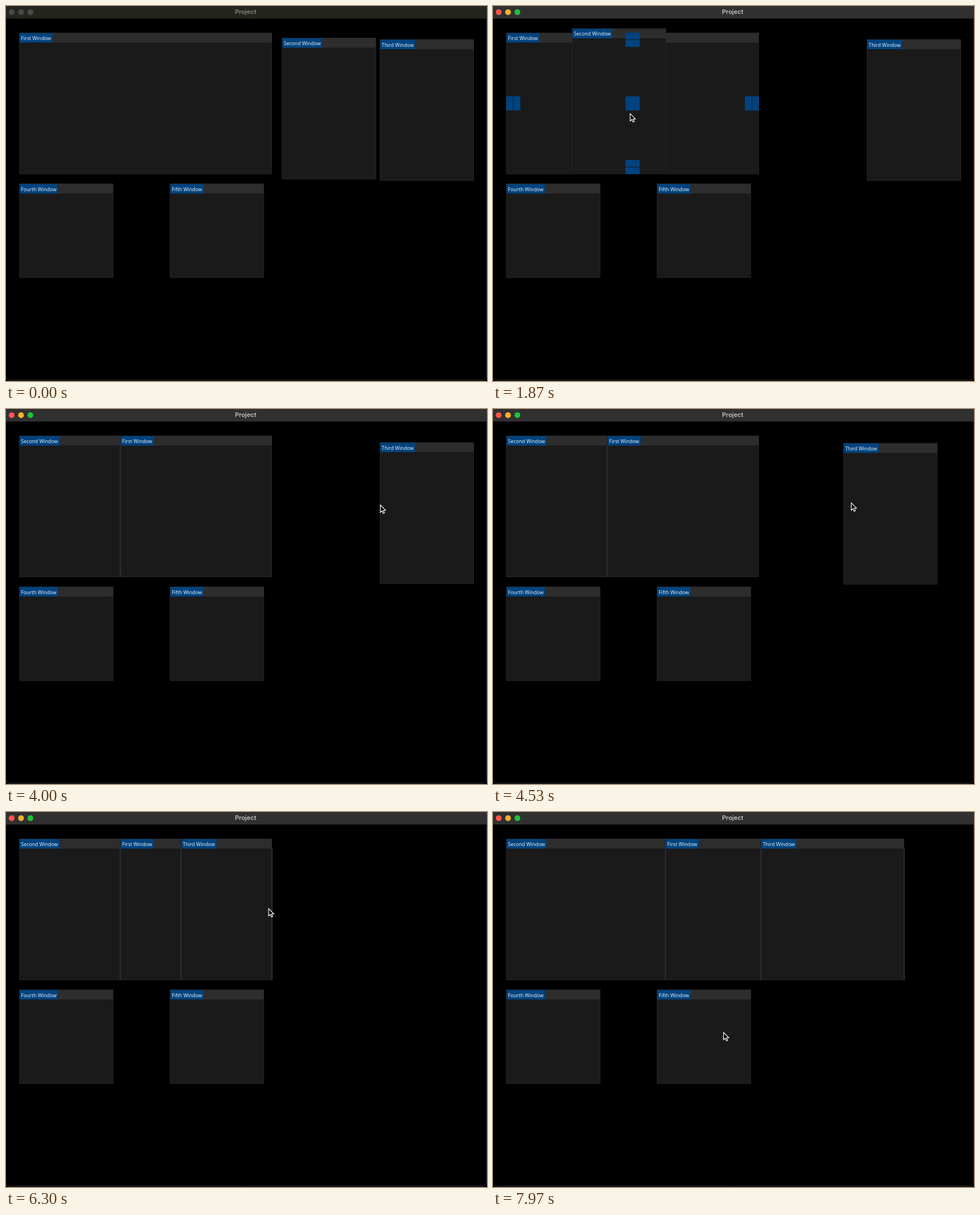
Write an HTML page with a canvas that moves like this. It is 848 by 660 pixels and loops after 8000 ms.

```html
<!DOCTYPE html>
<html lang="en">
<head>
<meta charset="utf-8">
<title>Project</title>
<style>
  html, body { margin: 0; width: 100%; height: 100%; overflow: hidden; background: #000; }
  canvas { display: block; }
</style>
</head>
<body>
<canvas id="stage" width="848" height="660"></canvas>
<script>
const ctx = document.getElementById('stage').getContext('2d');
const LOOP = 8000, ACTIVATE = 1000, RESIZE = 7000;
const LAG = 90; // the app reacts this long after the pointer
const UNIT = 0.83; // one app pixel on the stage
const BLUE = '#00437f', HOT = '#0063a9', BODY = '#1a1a1a', BAR = '#2d2d2d', BORDER = '#2b2b31';
const TITLE = 21 * UNIT, PANEL = 200 * UNIT;
const dock = { x: 28 * UNIT, y: 46.9, w: 537 * UNIT, h: 300 * UNIT };
const dragSecond = { from: 1500, drop: 2850 };
const dragThird = { from: 4450, drop: 5700 };

// Each move eases the pointer to a new resting place
const moves = [
  { from: 100, to: 800, x: 589, y: 206 },
  { from: dragSecond.from, to: 2430, x: 45.5, y: 180 },
  { from: 3100, to: 3930, x: 660, y: 169 },
  { from: 4150, to: 4300, x: 673, y: 164 },
  { from: dragThird.from, to: 5230, x: 463, y: 170 },
  { from: 6300, to: 6750, x: 470, y: 175 },
  { from: RESIZE, to: 7631, x: 726, y: 175 },
  { from: 7830, to: 7970, x: 406.5, y: 388 }
];

const clamp = k => Math.min(1, Math.max(0, k));
const easeOut = k => 1 - (1 - k) ** 2;

function pointer(t) {
  return moves.reduce((p, m) => {
    const k = easeOut(clamp((t - m.from) / (m.to - m.from)));
    return { x: p.x + (m.x - p.x) * k, y: p.y + (m.y - p.y) * k };
  }, { x: 612, y: 640 });
}

function offset(t, start) {
  const now = pointer(t), grab = pointer(start);
  return t > start ? { x: now.x - grab.x, y: now.y - grab.y } : { x: 0, y: 0 };
}

function box(x, y, w, h, color) {
  ctx.fillStyle = color;
  ctx.fillRect(x, y, w, h);
}

function panel(name, x, y, w, h) {
  box(x, y, w, h, BORDER);
  box(x + UNIT, y + UNIT, w - 2 * UNIT, TITLE - UNIT, BAR);
  box(x + UNIT, y + TITLE, w - 2 * UNIT, h - TITLE - UNIT, BODY);
  ctx.font = '8.7px "Noto Sans", sans-serif';
  ctx.textAlign = 'left';
  box(x + UNIT, y + UNIT, ctx.measureText(name).width + 6 * UNIT, TITLE - UNIT, BLUE);
  ctx.fillStyle = '#e6edf4';
  ctx.fillText(name, x + 4 * UNIT, y + 13);
}

// A panel that floats until it is dropped into its slot
function dockable(name, t, drag, x, y, slotX, slotW) {
  if (t >= drag.drop) return panel(name, slotX, dock.y, slotW, dock.h);
  const d = offset(t, drag.from);
  panel(name, x + d.x, y + d.y, PANEL, dock.h);
}

function separator(x) {
  box(x - 1, dock.y + TITLE, 2, dock.h - TITLE, '#2e2e2e');
}

function guides(x, w, hover) {
  const { y, h } = dock, size = 25, half = 12;
  const cx = x + (w - size) / 2, cy = y + (h - size) / 2;
  const target = (left, top, width, height) => {
    const inside = hover.x >= left && hover.x <= left + width && hover.y >= top && hover.y <= top + height;
    box(left, top, width, height, inside ? HOT : BLUE);
  };
  target(cx, cy, size, size);
  for (const d of [0, half + 1]) {
    target(x + d, cy, half, size);
    target(x + w - size + d, cy, half, size);
    target(cx, y + d, size, half);
    target(cx, y + h - size + d, size, half);
  }
}

function frame(active) {
  box(0, 0, 848, 22, active ? '#303030' : '#252520');
  const lights = active ? ['#ff544d', '#f6b02c', '#20c13c'] : Array(3).fill('#4a4a47');
  lights.forEach((color, i) => {
    ctx.fillStyle = color;
    ctx.beginPath();
    ctx.arc(10 + i * 16.5, 10.8, 5.1, 0, 7);
    ctx.fill();
  });
  ctx.font = '600 11px Inter, sans-serif';
  ctx.textAlign = 'center';
  ctx.fillStyle = active ? '#c3c3c0' : '#85857f';
  ctx.fillText('Project', 422.5, 14.3);
  ctx.strokeStyle = '#333';
  ctx.lineWidth = 1;
  ctx.beginPath();
  ctx.roundRect(-0.5, -0.5, 848, 659, 7);
  ctx.stroke();
}

const arrowShape = new Path2D('M0 0V13L3 10.3L5 14.8L7.2 13.9L5.2 9.5H9.2Z');

function arrow({ x, y }) {
  ctx.save();
  ctx.translate(x, y);
  ctx.fillStyle = '#000';
  ctx.fill(arrowShape);
  ctx.strokeStyle = '#fff';
  ctx.lineWidth = 1.2;
  ctx.stroke(arrowShape);
  ctx.restore();
}

function draw(t) {
  const p = pointer(t);
  const secondIn = t >= dragSecond.drop, thirdIn = t >= dragThird.drop;
  const w = dock.w + offset(Math.min(t - LAG, 7800), RESIZE).x;
  const right = dock.x + w;
  const firstX = dock.x + (secondIn ? w * 0.4 : 0);
  const thirdX = thirdIn ? dock.x + w * 0.64 : right;

  box(0, 0, 848, 660, '#000');
  panel('Fourth Window', dock.x, 312.5, PANEL, PANEL);
  panel('Fifth Window', 348 * UNIT, 312.5, PANEL, PANEL);
  panel('First Window', firstX, dock.y, thirdX - firstX, dock.h);
  dockable('Second Window', t, dragSecond, 586 * UNIT, 56, dock.x, firstX - dock.x);
  dockable('Third Window', t, dragThird, 794 * UNIT, 58.6, thirdX, right - thirdX);
  if (secondIn) separator(firstX);
  if (thirdIn) [thirdX, right].forEach(separator);

  const dragging = [dragSecond, dragThird].some(d => t > d.from && t < d.drop);
  if (dragging && p.x < right) guides(firstX, right - firstX, pointer(t - LAG));
  frame(t >= ACTIVATE);
  if (t > moves[0].from) arrow(p);
}

function tick() {
  draw(performance.now() % LOOP);
  requestAnimationFrame(tick);
}
tick();
</script>
</body>
</html>
```
